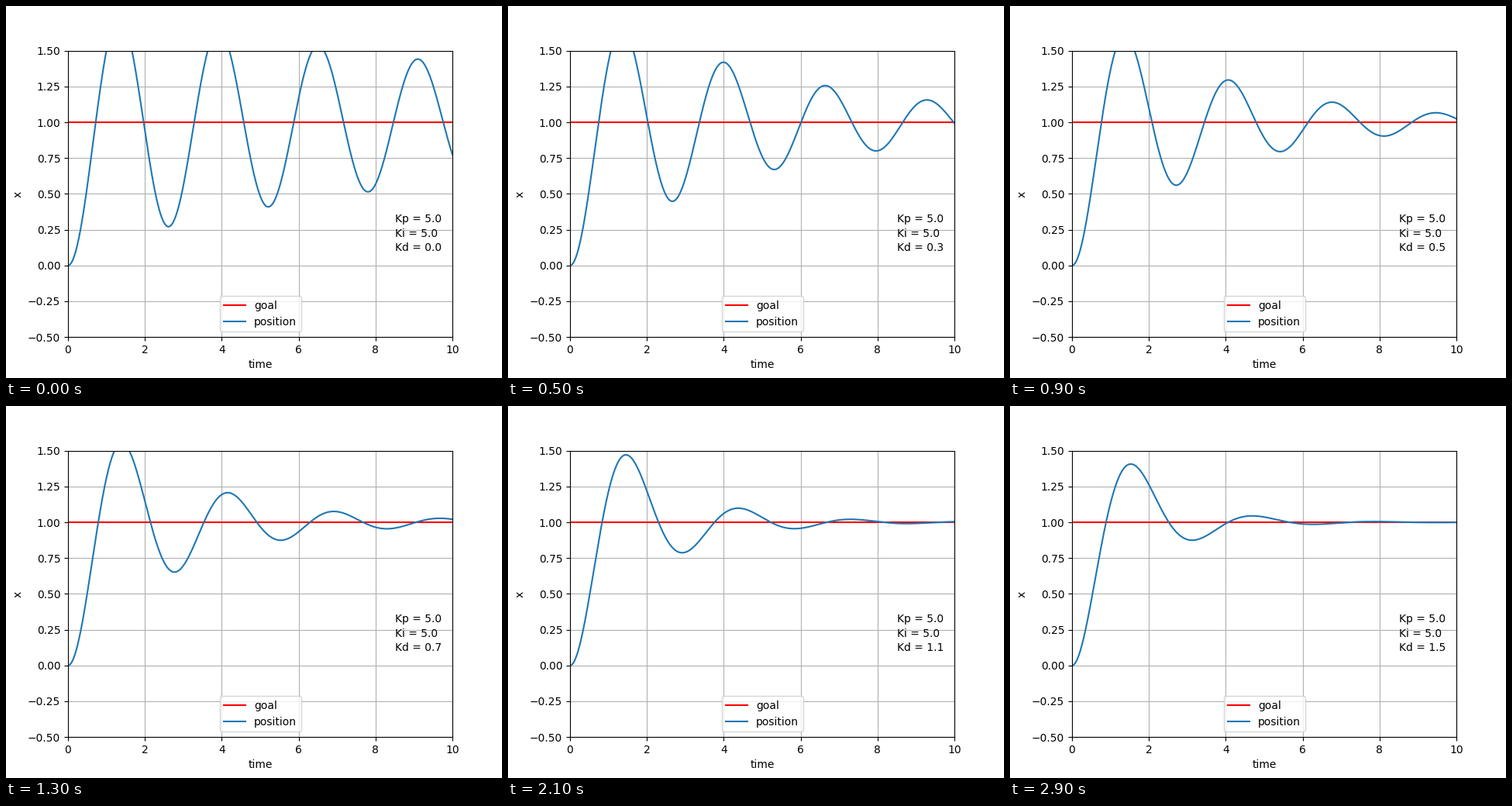
A matplotlib script that plays this animation: 640 px wide and 480 px high, repeating every 3 s.

```python
import numpy as np
import matplotlib.pyplot as plt
from matplotlib.animation import FuncAnimation

FRAMES = 30
KP, KI = 5.0, 5.0
KD = np.linspace(0, 1.5, FRAMES)
MASS, DAMPING, SPRING = 1.0, 1.0, 1.0
GOAL = 1.0
t = np.linspace(0, 10, 1000)


def step_response(kd):
    """Position of a PID-driven mass-spring-damper, from the poles of its error."""
    num = [MASS, DAMPING + kd, SPRING]
    den = [MASS, DAMPING + kd, SPRING + KP, KI]
    error = 0
    for pole in np.roots(den):
        residue = np.polyval(num, pole) / np.polyval(np.polyder(den), pole)
        error = error + residue * np.exp(pole * t)
    return GOAL * (1 - error.real)


fig, ax = plt.subplots(figsize=(6.4, 4.8), dpi=100)
ax.set(xlim=(0, 10), ylim=(-0.5, 1.5), xlabel="time", ylabel="x")
ax.grid()

ax.plot(t, np.full_like(t, GOAL), color="r", label="goal")
position, = ax.plot([], [], color="C0", label="position")
ax.legend(loc="lower center")

ax.text(8.5, 0.3, f"Kp = {KP:.1f}")
ax.text(8.5, 0.2, f"Ki = {KI:.1f}")
kd_label = ax.text(8.5, 0.1, "")


def update(i):
    position.set_data(t, step_response(KD[i]))
    kd_label.set_text(f"Kd = {KD[i]:.1f}")
    return position, kd_label


anim = FuncAnimation(fig, update, frames=FRAMES, interval=100, repeat=True)
plt.show()
```
